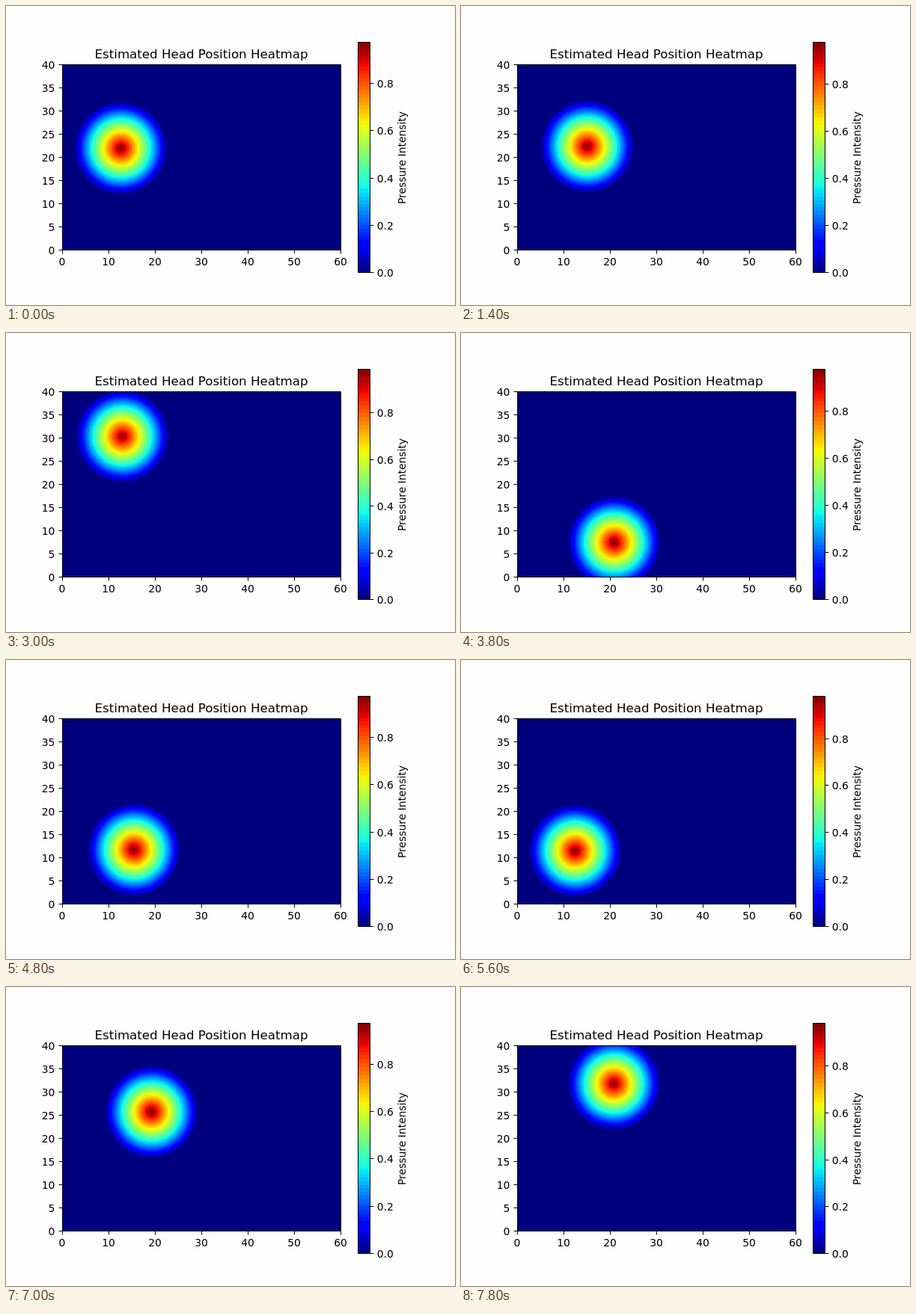
An HTML page with a canvas for the animation above (8000 ms loop, 600 by 400 pixels).

```html
<!DOCTYPE html>
<html lang="en">
<head>
<meta charset="utf-8">
<title>Heatmap</title>
<style>
  html, body { margin: 0; width: 100%; height: 100%; overflow: hidden; background: #fefefe; }
  canvas, svg { position: absolute; }
  #heat { left: 75px; top: 78px; }
  #bar { left: 470px; top: 48px; }
  svg { left: 0; top: 0; }
  text { font: 13.89px "DejaVu Sans", sans-serif; }
  .title { font-size: 16.67px; }
  path { fill: none; stroke: #000; }
</style>
</head>
<body>
<canvas id="heat" width="372" height="248"></canvas>
<canvas id="bar" width="16" height="308"></canvas>
<svg id="chart" width="600" height="400">
  <path d="M75.5 78.5H447.5V326.5H75.5ZM470.5 48.5H486.5V356.5H470.5Z"/>
  <text class="title" x="261" y="70" text-anchor="middle">Estimated Head Position Heatmap</text>
  <text transform="translate(533.5 203) rotate(-90)" text-anchor="middle">Pressure Intensity</text>
</svg>
<script>
const STEP = 200, STEPS = 40, CELLS = 100, RADIUS = 10;
const WIDTH = 60, HEIGHT = 40, SCALE = 6.2;

// Key points of the head's path
const route = [
  { step: 0, x: 12.66, y: 21.9 },
  { step: 7, x: 15.1, y: 22.3 },
  { step: 12, x: 9.2, y: 29.6 },
  { step: 15, x: 13, y: 30.3 },
  { step: 18, x: 15.5, y: 31 },
  { step: 19, x: 20.93, y: 7.4 },
  { step: 24, x: 15.5, y: 11.65 },
  { step: 27, x: 11.1, y: 9 },
  { step: 32, x: 18.1, y: 21.1 },
  { step: 39, x: 20.85, y: 31.7 }
];

const chart = document.getElementById('chart');
const heat = document.getElementById('heat').getContext('2d');
const bar = document.getElementById('bar').getContext('2d');

function add(tag, attrs, label = '') {
  const node = document.createElementNS(chart.namespaceURI, tag);
  for (const key in attrs) node.setAttribute(key, attrs[key]);
  node.textContent = label;
  return chart.appendChild(node);
}

// Rainbow scale: each channel rises, holds and falls
const channel = (rise, fall) => Math.floor(255 * Math.max(0, Math.min(1, rise, fall)));
const rainbow = v => [
  channel((v - .35) / .31, 1 - (v - .89) / .22),
  channel((v - .125) / .25, (.91 - v) / .27),
  channel(.5 + v / .22, (.65 - v) / .31)
];

// Colours that share a 16-level bucket are merged into their mean
function bandedPalette() {
  const colors = Array.from({ length: 256 }, (_, i) => rainbow(i / 255));
  const buckets = {};
  const key = color => color.map(v => v >> 4).join();
  for (const color of colors) (buckets[key(color)] ||= []).push(color);
  return colors.map(color => {
    const group = buckets[key(color)];
    const mean = color.map((_, n) => group.reduce((sum, c) => sum + c[n], 0) / group.length);
    return [...mean, 255];
  });
}

const palette = bandedPalette();

function paint(ctx, levelAt) {
  const { width, height } = ctx.canvas;
  const image = ctx.createImageData(width, height);
  for (let y = 0; y < height; y++) {
    for (let x = 0; x < width; x++) {
      const index = Math.min(255, Math.floor(levelAt(x, y) * 256));
      image.data.set(palette[index], (y * width + x) * 4);
    }
  }
  ctx.putImageData(image, 0, 0);
}

// For every pixel: its two neighbouring cells and a cosine blend between them
function samples(size) {
  return Array.from({ length: size }, (_, pixel) => {
    const pos = Math.max(0, Math.min(CELLS - 1, (pixel + .5) * CELLS / size - .5));
    const low = Math.floor(pos);
    return { low, high: Math.min(CELLS - 1, low + 1), mix: (1 - Math.cos(Math.PI * (pos - low))) / 2 };
  });
}

const columns = samples(heat.canvas.width);
const rows = samples(heat.canvas.height);
const lerp = (a, b, k) => a + (b - a) * k;

paint(bar, (x, y) => 1 - (y + .5) / bar.canvas.height);

for (let v = 0; v <= WIDTH; v += 10) {
  const x = 75 + v * SCALE;
  add('path', { d: `M${x + .5} 326.5v5` });
  add('text', { x, y: 347, 'text-anchor': 'middle' }, v);
}
for (let v = 0; v <= HEIGHT; v += 5) {
  const y = Math.round(326 - v * SCALE);
  add('path', { d: `M75.5 ${y + .5}h-5` });
  add('text', { x: 65.3, y: y + 6, 'text-anchor': 'end' }, v);
}
const barTicks = Array.from({ length: 5 }, (_, i) => ({
  value: i / 5,
  mark: add('path', { d: 'M486.5 .5h5' }),
  label: add('text', { x: 495.7, y: 6 }, (i / 5).toFixed(1))
}));

function headAt(step) {
  const next = Math.max(1, route.findIndex(p => p.step >= step));
  const a = route[next - 1], b = route[next];
  const k = (step - a.step) / (b.step - a.step);
  return { x: lerp(a.x, b.x, k), y: lerp(a.y, b.y, k) };
}

function draw(step) {
  const head = headAt(step);
  const grid = Array.from({ length: CELLS }, (_, row) =>
    Array.from({ length: CELLS }, (_, col) => {
      const x = (col + .5) * WIDTH / CELLS;
      const y = HEIGHT - (row + .5) * HEIGHT / CELLS;
      return Math.max(0, 1 - Math.hypot(x - head.x, y - head.y) / RADIUS);
    }));
  const peak = Math.max(...grid.flat());
  paint(heat, (px, py) => {
    const c = columns[px], r = rows[py];
    const top = grid[r.low], bottom = grid[r.high];
    return lerp(lerp(top[c.low], top[c.high], c.mix),
                lerp(bottom[c.low], bottom[c.high], c.mix), r.mix) / peak;
  });
  for (const { value, mark, label } of barTicks) {
    const move = `translate(0 ${Math.round(356 - 308 * value / peak)})`;
    mark.setAttribute('transform', move);
    label.setAttribute('transform', move);
  }
}

let shown = -1;
function tick() {
  const step = Math.floor(performance.now() / STEP) % STEPS;
  if (step !== shown) draw(shown = step);
  requestAnimationFrame(tick);
}
tick();
</script>
</body>
</html>
```
